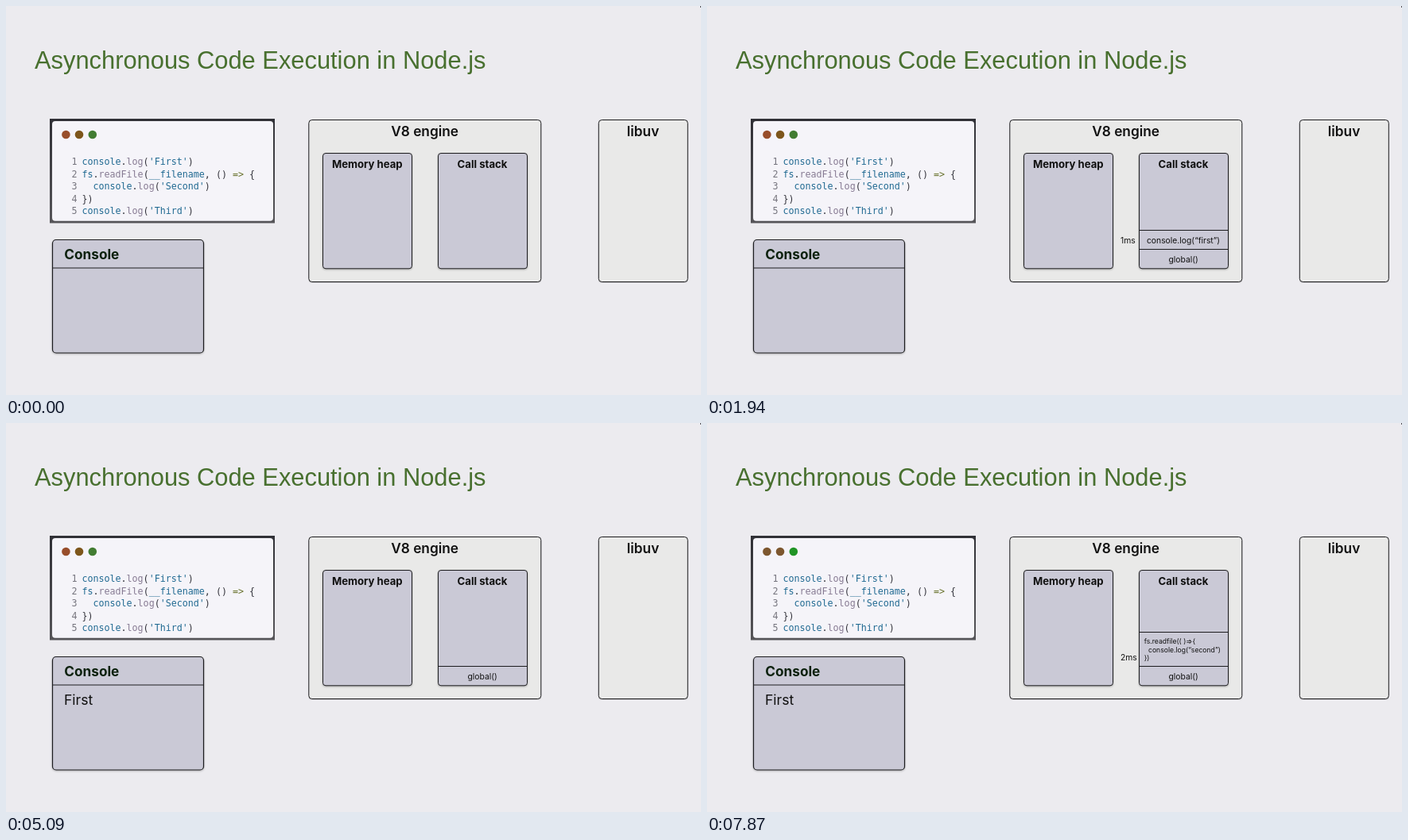
Animation, 874 px wide and 490 px high, one loop 8000 ms. Source, as an HTML page:

```html
<!DOCTYPE html>
<html lang="en">
<head>
<meta charset="utf-8">
<title>Asynchronous Code Execution</title>
<style>
  html, body { margin: 0; height: 100%; overflow: hidden; background: #ecebef; }
  svg { display: block; width: 100vw; height: 100vh; font-family: Inter, sans-serif; fill: #111; }
  .title { font: 30.85px "Liberation Sans", Arial, sans-serif; fill: #48702f; }
  .code { font: 11.66px "DejaVu Sans Mono", monospace; fill: #34343c; white-space: pre; }
  .num { fill: #77767f; }
  .id { fill: #216a92; }
  .fn { fill: #877b93; }
  .arrow { fill: #66702a; }
  .panel, .box, .rule { stroke: #1c1c1e; }
  .panel { fill: #e9e9e8; filter: drop-shadow(0 1px 0.5px #0002); }
  .box { fill: #cac9d6; filter: drop-shadow(0 1px 1px #0004); }
  .big { font-size: 17.3px; font-weight: 600; }
  .head { font-size: 13.15px; font-weight: 700; }
  .console { font-size: 17.2px; font-weight: 700; fill: #0a200b; }
  .out { font-size: 17.5px; }
  .call { font-size: 10.35px; }
  .small { font-size: 8.65px; }
  .mid { text-anchor: middle; }
</style>
</head>
<body>
<svg viewBox="0 0 874 490">
  <defs>
    <linearGradient id="frame" x2="0" y2="1">
      <stop stop-color="#303036"/><stop offset="1" stop-color="#565559"/>
    </linearGradient>
  </defs>
  <rect width="874" height="490" fill="#ecebef"/>
  <rect x="873" width="1" height="2" fill="#55555a"/>
  <text class="title" x="36" y="79">Asynchronous Code Execution in Node.js</text>

  <rect x="55" y="142" width="283" height="131.5" fill="url(#frame)"/>
  <rect x="58" y="145" width="278" height="125.7" rx="4" fill="#f5f4f9"/>
  <g id="dots">
    <circle cx="75.4" cy="162" r="5.3"/>
    <circle cx="92" cy="162" r="5.3"/>
    <circle cx="108.8" cy="162" r="5.3"/>
  </g>
  <g id="code"></g>

  <rect class="box" x="58.5" y="294.5" width="190" height="142.5" rx="4.5" stroke-width="1.2"/>
  <path class="rule" d="M58.5 330H248.5"/>
  <text class="console" x="73.3" y="319">Console</text>

  <rect class="panel" x="380.8" y="143.5" width="292" height="204" rx="4"/>
  <rect class="panel" x="745.3" y="143.5" width="112" height="204" rx="4"/>
  <rect class="box" x="398.5" y="185.5" width="112" height="145.3" rx="3.5"/>
  <rect class="box" x="543.5" y="185.5" width="112" height="145.3" rx="3.5"/>
  <text class="big mid" x="526.6" y="164">V8 engine</text>
  <text class="big mid" x="801" y="164">libuv</text>
  <text class="head mid" x="454.3" y="203.8">Memory heap</text>
  <text class="head mid" x="599" y="203.8">Call stack</text>

  <g data-from="530">
    <path class="rule" d="M543.5 306.5H655.5"/>
    <text class="call mid" x="599.2" y="322.9">global()</text>
  </g>
  <g data-from="1940" data-to="5090">
    <path class="rule" d="M543.5 282.5H655.5"/>
    <text class="call mid" x="599" y="299">console.log(“first”)</text>
    <text class="call" x="520" y="299">1ms</text>
  </g>
  <g data-from="3490">
    <text class="out" x="73" y="355">First</text>
  </g>
  <g data-from="6560">
    <path class="rule" d="M543.5 263.5H655.5"/>
    <g class="small">
      <text x="549.7" y="277.9">fs.readfile(( )=&gt;{</text>
      <text x="555" y="288.7">console.log(“second”)</text>
      <text x="549.7" y="299.2">})</text>
    </g>
    <text class="call" x="520" y="299">2ms</text>
  </g>
</svg>
<script>
  const LOOP = 8000, REFRESH = 7870;
  const id = s => `<tspan class="id">${s}</tspan>`;
  const fn = s => `<tspan class="fn">${s}</tspan>`;
  const log = word => `${id('console')}.${fn('log')}(${id(`'${word}'`)})`;

  const lines = [
    log('First'),
    `${id('fs')}.${fn('readFile')}(${id('__filename')}, () <tspan class="arrow">=&gt;</tspan> {`,
    '  ' + log('Second'),
    '})',
    log('Third'),
  ];
  document.getElementById('code').innerHTML = lines.map((line, i) => {
    const y = 200 + 15.5 * i;
    return `<text class="code num" x="82.6" y="${y}">${i + 1}</text>` +
           `<text class="code" x="95.4" y="${y}">${line}</text>`;
  }).join('');

  const dots = [...document.getElementById('dots').children];
  const steps = [...document.querySelectorAll('[data-from]')];
  const early = ['#984e2b', '#7d561b', '#427c32'];
  const late = ['#7d572f', '#7d572f', '#209425'];

  function draw(now) {
    const t = now % LOOP;
    for (const step of steps) {
      const { from, to = LOOP } = step.dataset;
      step.style.display = t >= +from && t < +to ? '' : 'none';
    }
    const colors = t < REFRESH ? early : late;
    dots.forEach((dot, i) => dot.setAttribute('fill', colors[i]));
    requestAnimationFrame(() => draw(performance.now()));
  }
  draw(performance.now());
</script>
</body>
</html>
```
